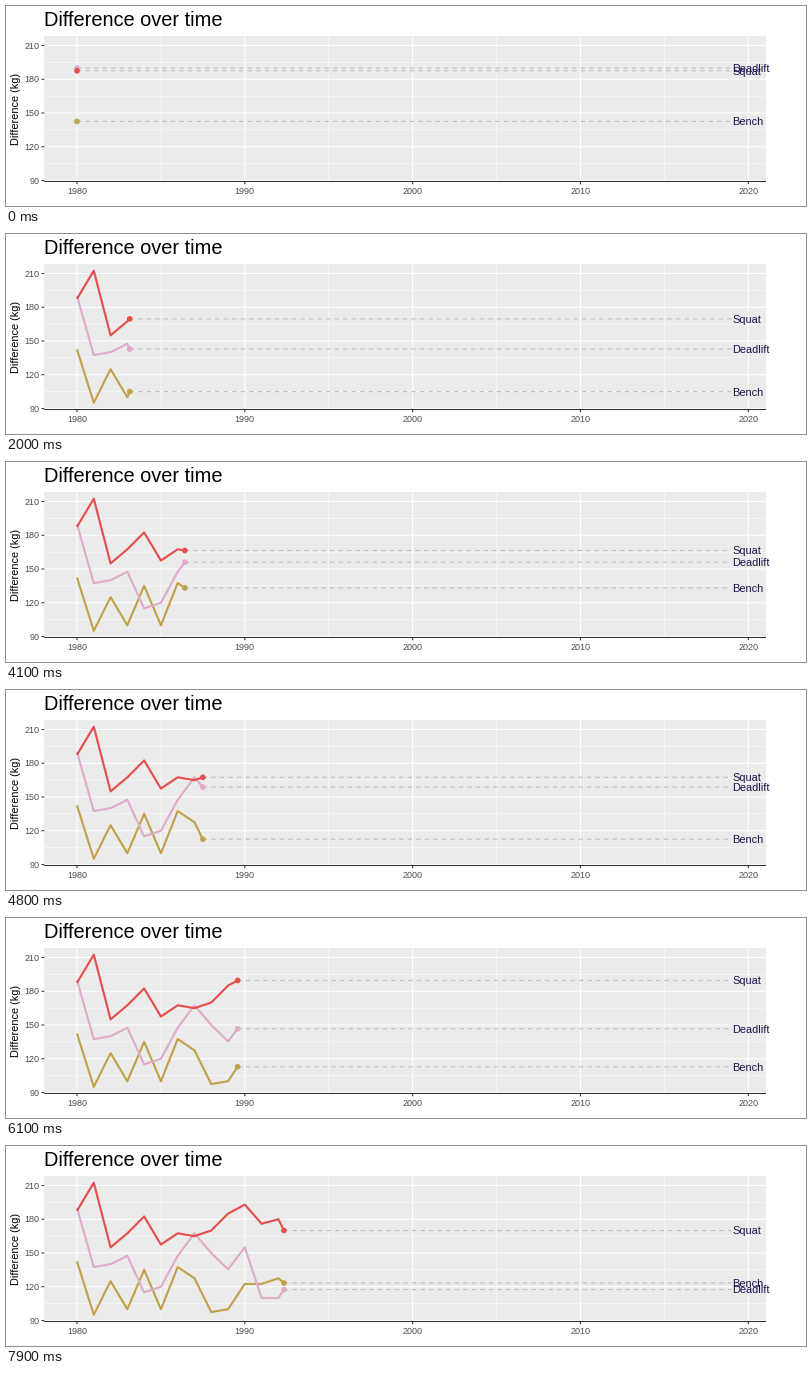
A matplotlib script that plays this animation: 800x200 px, repeating every 8000 ms.

```python
import numpy as np
import matplotlib.pyplot as plt
from matplotlib.animation import FuncAnimation

W, H, DPI = 800, 200, 100
PX = 72 / DPI                       # points per pixel
LEFT, RIGHT, TOP, BOTTOM = 38.2, 760, 30.1, 175.5
FRAMES, STEPS, SPAN = 80, 249, 39   # the full run covers 39 years in 249 steps
THIN = 1.067
INK, GREY = "#333333", "#4D4D4D"

plt.rcParams["font.family"] = "Liberation Sans"

# name: colour, one corner of the line per year from 1980
SERIES = {
    "Bench": ("#C1A24C", [142.5, 95, 125, 100, 135, 100, 137.5, 127.5, 97.5,
                          100, 122.5, 122.5, 127.5, 115]),
    "Deadlift": ("#E0ABC9", [190, 137.5, 140, 147.5, 115, 120, 147.5, 167.5,
                             150, 135.5, 155, 110, 110, 132.5]),
    "Squat": ("#E34F4D", [187.5, 212.5, 155, 167.5, 182.5, 157.5, 167.5, 165,
                          170, 185, 193, 176, 180, 150]),
}
YEARS = np.arange(14)
KEYS = np.round(YEARS * STEPS / SPAN)   # step on which each year is reached


def px(year):
    return 71 + (np.asarray(year) - 1980) * 16.782


def py(value):
    return 174.5 - (np.asarray(value) - 90) * 1.125


fig = plt.figure(figsize=(W / DPI, H / DPI), dpi=DPI, facecolor="white")
ax = fig.add_axes([0, 0, 1, 1])
ax.set(xlim=(0, W), ylim=(H, 0))
ax.axis("off")


def line(x, y, color, width, z, **kw):
    return ax.plot(x, y, color=color, lw=width * PX, zorder=z, snap=False,
                   solid_capstyle="butt", solid_joinstyle="round",
                   dash_capstyle="butt", **kw)[0]


def text(x, y, s, size, color, ha="left", **kw):
    return ax.text(x, y, s, fontsize=size * PX, color=color, ha=ha,
                   va="baseline", zorder=9, **kw)


def draw_panel():
    ax.add_patch(plt.Rectangle((LEFT, TOP), RIGHT - LEFT, BOTTOM - TOP,
                               fc="#EBEBEB", lw=0, zorder=0, snap=False))
    for x in px(range(1985, 2020, 10)):
        line([x, x], [TOP, BOTTOM], "white", THIN / 2, 1)
    for y in py(range(105, 200, 30)):
        line([LEFT, RIGHT], [y, y], "white", THIN / 2, 1)
    for year in range(1980, 2021, 10):
        x = px(year)
        line([x, x], [TOP, BOTTOM], "white", THIN, 1.5)
        line([x, x], [BOTTOM, BOTTOM + 2.75], INK, THIN, 2)
        text(x, 187.8, str(year), 9, GREY, "center")
    for v in range(90, 211, 30):
        y = py(v)
        line([LEFT, RIGHT], [y, y], "white", THIN, 1.5)
        line([LEFT - 2.75, LEFT], [y, y], INK, THIN, 2)
        text(33.2, y + 3.2, str(v), 9, GREY, "right")
    line([LEFT, RIGHT], [BOTTOM, BOTTOM], INK, THIN, 2)
    text(38.2, 20, "Difference over time", 20, "black")
    text(13.4, (TOP + BOTTOM) / 2, "Difference (kg)", 11, "black", "center",
         rotation=90, rotation_mode="anchor")


def make_parts(name, color, z):
    trail = line([], [], color, 2 * THIN, 4 + z)
    guide = line([], [], "#BEBEBE", THIN, 3, ls=(0, (4, 4)))
    dot = ax.add_patch(plt.Circle((0, 0), 2.84, fc=color, lw=0, zorder=5 + z))
    label = text(726.5, 0, name, 11, "#191150")
    return trail, guide, dot, label


draw_panel()
parts = {name: make_parts(name, color, i / 10)
         for i, (name, (color, _)) in enumerate(SERIES.items())}


def update(step):
    t = np.interp(step, KEYS, YEARS)
    ts = np.append(YEARS[YEARS < t], t)
    xs = px(1980 + ts)
    for name, (trail, guide, dot, label) in parts.items():
        ys = py(np.interp(ts, YEARS, SERIES[name][1]))
        x, y = xs[-1], ys[-1]
        trail.set_data(xs, ys)
        guide.set_data([x, px(2019)], [y, y])
        dot.center = x, y
        label.set_y(y + 3.9)
    return [p for group in parts.values() for p in group]


anim = FuncAnimation(fig, update, frames=FRAMES, interval=100, repeat=True,
                     repeat_delay=0, blit=False)
plt.show()
```
